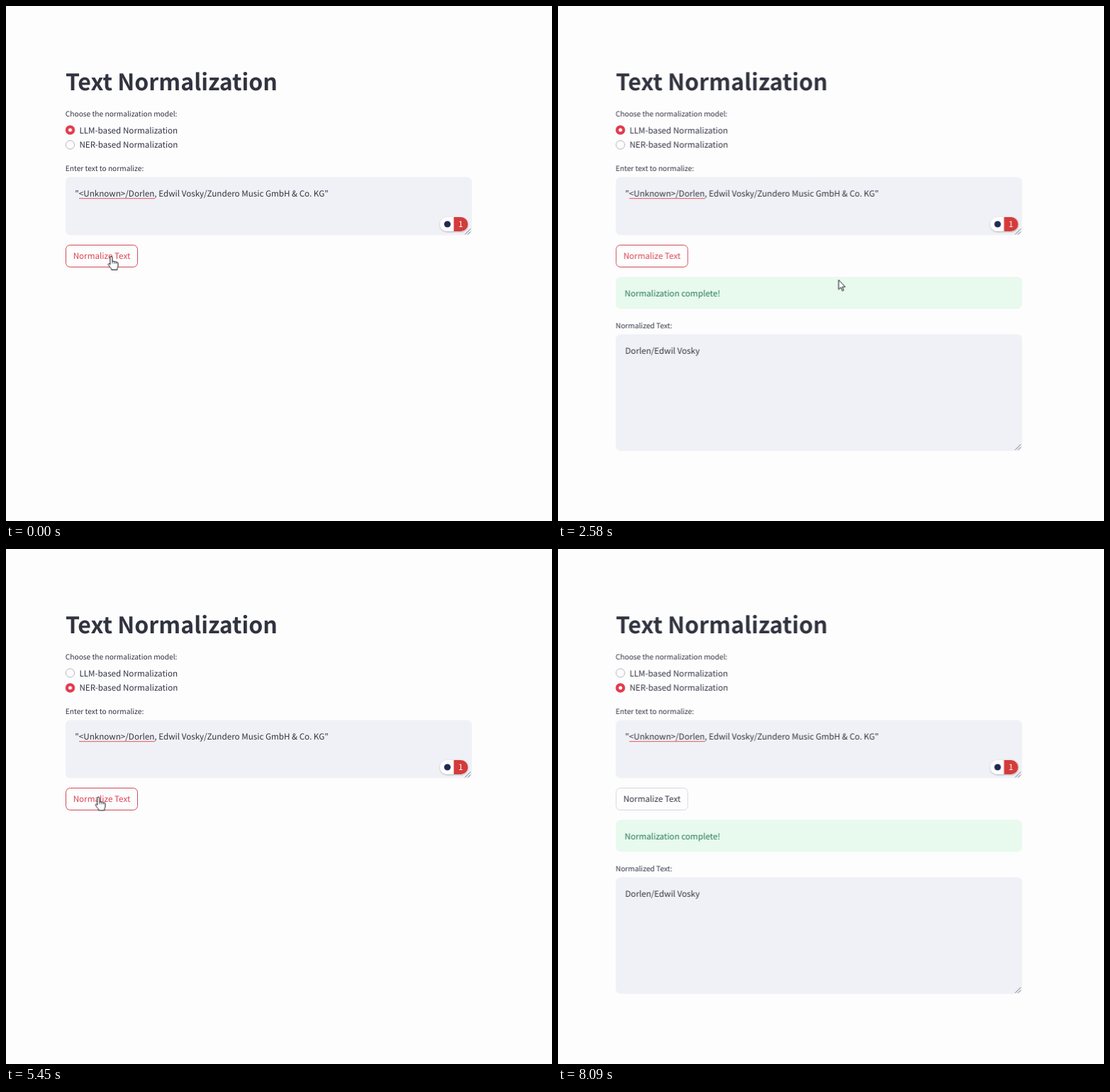
An HTML page for the animation above (8.12 s loop, 770 px wide and 727 px high).

```html
<!DOCTYPE html>
<html lang="en">
<head>
<meta charset="utf-8">
<title>Text Normalization</title>
<style>
html, body { margin: 0; width: 100%; height: 100%; overflow: hidden; background: #fdfdfe; }
svg { display: block; width: 770px; height: 727px; }
text {
  font-family: "Noto Sans CJK JP", "Noto Sans CJK SC", "Noto Sans CJK", "Noto Sans", sans-serif;
  font-size: 11.66px; fill: #31333f; text-rendering: geometricPrecision;
}
.title { font-size: 32.05px; font-weight: 700; }
.label { font-size: 10.2px; }
.field { fill: #f0f1f6; }
.ring { fill: #fdfdfe; stroke: #b3b4bb; }
.grip { fill: none; stroke: #63656e; stroke-width: .9; }

/* Hard changes: one shared loop length, steps between keys */
.step { animation: 8.12s step-end infinite; }
#page { animation-name: page; }
#result { animation-name: result; }
#pick { animation-name: pick; }
#nerRing { animation-name: hover; }
#button rect { fill: #fdfdfe; animation-name: border; }
#button text { text-anchor: middle; animation-name: caption; }

/* Without the result the page has no scrollbar and sits further right */
@keyframes page {
  0%, 46.8% { transform: translateX(2.5px); }
  17.24%, 70.2%, 100% { transform: none; }
}
@keyframes result {
  0%, 46.8% { opacity: 0; }
  17.24%, 70.2%, 100% { opacity: 1; }
}
@keyframes pick {
  0% { transform: none; }
  43.84%, 100% { transform: translateY(21px); }
}
@keyframes hover {
  0%, 43.84%, 100% { fill: #fdfdfe; }
  38.4% { fill: #ededf1; }
}
@keyframes border {
  0%, 60.8% { stroke: #cf4a55; }
  43.84%, 96.67%, 100% { stroke: #d6d7dc; }
}
@keyframes caption {
  0%, 60.8% { fill: #dc4150; }
  43.84%, 96.67%, 100% { fill: #31333f; }
}

#pointer { animation: move 8.12s ease-in-out infinite; }
#hand { animation-name: hand; }
#arrow { animation-name: arrow; }
#beam { animation-name: beam; }
#hand path, #arrow path { fill: #fff; stroke: #15161c; stroke-linejoin: round; }
#beam path { fill: none; stroke: #15161c; }

@keyframes move {
  0%, 6.16% { transform: translate(148.5px, 354px); }
  18.47%, 27.71% { transform: translate(499.5px, 450px); }
  39.41%, 48.65% { transform: translate(89.5px, 199.5px); }
  56.4%, 57.27% { transform: translate(108.5px, 264px); }
  62.19%, 70.2% { transform: translate(130.5px, 350.5px); }
  76%, 88.05% { transform: translate(133.5px, 348.5px); }
  93.6%, 100% { transform: translate(260px, -25px); }
}
@keyframes hand {
  0%, 38.4%, 60.8% { opacity: 1; }
  8.62%, 49.9%, 88.7%, 100% { opacity: 0; }
}
@keyframes arrow {
  0%, 33.56%, 38.4%, 53.1%, 60.8%, 89.1%, 93.6%, 100% { opacity: 0; }
  8.62%, 35.9%, 49.9%, 60.3%, 88.7%, 90.05% { opacity: 1; }
}
@keyframes beam {
  0%, 35.9%, 60.3%, 90.05%, 100% { opacity: 0; }
  33.56%, 53.1%, 89.1% { opacity: 1; }
}
</style>
</head>
<body>
<svg viewBox="0 0 770 727">
  <defs>
    <path id="grip" class="grip" d="M-8 8 0 0M-4 8 0 4"/>
    <filter id="shadow" x="-20%" y="-30%" width="140%" height="170%">
      <feDropShadow dx="0" dy=".8" stdDeviation="1" flood-color="#000" flood-opacity=".3"/>
    </filter>
  </defs>

  <g id="page" class="step">
    <text class="title" x="81.5" y="119">Text Normalization</text>

    <text class="label" x="81.3" y="155.6">Choose the normalization model:</text>
    <circle class="ring" cx="88" cy="175" r="6.1"/>
    <circle id="nerRing" class="ring step" cx="88" cy="196" r="6.1"/>
    <g id="pick" class="step">
      <circle cx="88" cy="175" r="6.6" fill="#e43a4c"/>
      <circle cx="88" cy="175" r="2.5" fill="#fff"/>
    </g>
    <text x="100.9" y="179.6">LLM-based Normalization</text>
    <text x="100.9" y="200.4">NER-based Normalization</text>

    <text class="label" x="81.3" y="232.8">Enter text to normalize:</text>
    <rect class="field" x="81.5" y="241.5" width="573" height="82" rx="6.5"/>
    <text x="94.8" y="269.3">"&lt;Unknown&gt;/Dorlen, Edwil Vosky/Zundero Music GmbH &amp; Co. KG"</text>
    <path d="M100.5 271.7H207.5" stroke="#e2737c" stroke-width="1.2"/>

    <use href="#grip" x="652.7" y="314.5"/>
    <g filter="url(#shadow)">
      <rect x="609.5" y="298" width="39.5" height="20" rx="10" fill="#fff"/>
      <path d="M629 298h10a10 10 0 0 1 0 20h-10z" fill="#d43a3b"/>
    </g>
    <circle cx="620" cy="308" r="4.6" fill="#1f2a55"/>
    <text x="638.7" y="312.3" text-anchor="middle" style="fill:#fff">1</text>

    <g id="button">
      <rect class="step" x="82" y="337.5" width="101" height="31" rx="6"/>
      <text class="step" x="132.5" y="357">Normalize Text</text>
    </g>

    <g id="result" class="step">
      <rect x="81.5" y="382.5" width="573" height="45" rx="6.5" fill="#e8f9ee"/>
      <text x="94" y="409.8" style="fill:#237a4f">Normalization complete!</text>
      <text class="label" x="81.3" y="454.8">Normalized Text:</text>
      <rect class="field" x="81.5" y="463.5" width="573" height="164.5" rx="6.5"/>
      <text x="94.8" y="491.3">Dorlen/Edwil Vosky</text>
      <use href="#grip" x="652.7" y="618.7"/>
    </g>
  </g>

  <g id="pointer">
    <g id="hand" class="step">
      <path d="M-1.7 11V1.2a1.6 1.6 0 0 1 3.2 0V6.5q1.4-1 2.8 .5q1.5-.8 2.7 .6q2-.6 2.5 1.4V13q0 2-1.2 3.2V18.5H.2V17q-2.5-2.5-4.8-6.5q1.1-2 2.9 0z"/>
      <path d="M1.5 6.5V9.5M4.3 7V9.8M7 7.6V10" stroke-width=".8"/>
    </g>
    <g id="arrow" class="step">
      <path d="M0 0V13.5l3.1-2.9 2.1 4.9 2-.9-2.1-4.7H9.3z"/>
    </g>
    <g id="beam" class="step">
      <path d="M-2.8-6.2h2L0-5.4 .8-6.2h2M0-5.4V5.4M-2.8 6.2h2L0 5.4 .8 6.2h2"/>
    </g>
  </g>
</svg>
</body>
</html>
```
